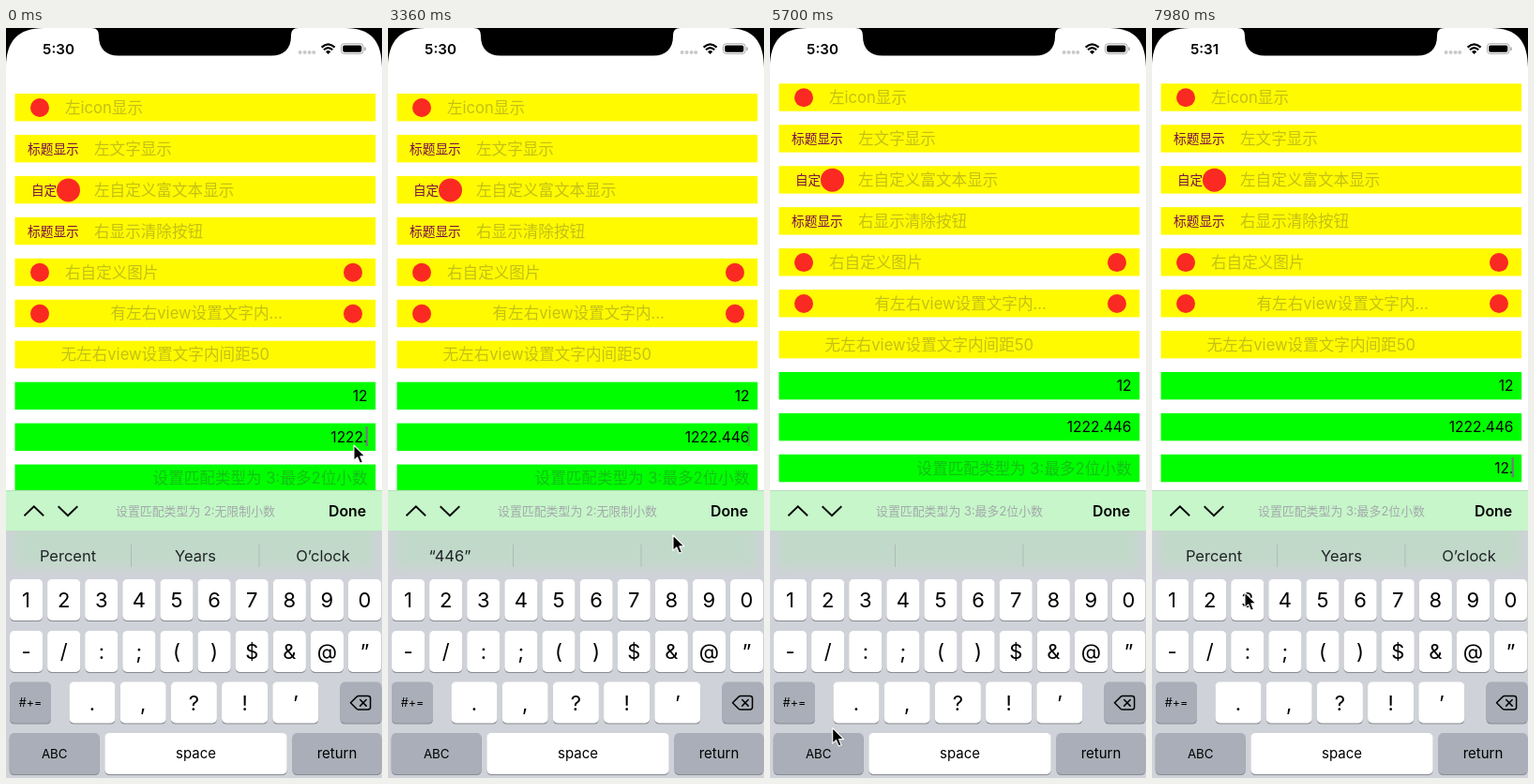
These frames come from a looping animation (401 by 800 pixels, 8000 ms). An HTML page:

```html
<!DOCTYPE html>
<html lang="zh-CN">
<head>
<meta charset="utf-8">
<title>Text fields</title>
<style>
  html, body { margin: 0; width: 100%; height: 100%; overflow: hidden; background: #fff; }
  svg { display: block; width: 100%; height: 100%; }
  text { font-family: Inter, "Noto Sans CJK SC", "Noto Sans CJK", "Noto Sans", sans-serif; white-space: pre; }
</style>
</head>
<body>
<svg id="stage" viewBox="0 0 401 800"></svg>
<script>
const LOOP = 8000, STEP = 60;
const FOCUS = 3960, SWITCH = 4960, CLOCK = 7200;
const HINT = 'rgba(60,60,67,.3)', RED = '#fa2a22', PURPLE = '#7a0c48';

// [time, key, field]
const taps = [
  [900, '4', 8], [1260, '4', 8], [1800, '6', 8],
  [6540, '1', 9], [6960, '2', 9], [7500, '.', 9]
];
// [time, x, y] of the pointer tip
const path = [
  [0, 371, 445], [300, 371, 445], [840, 150, 606], [1380, 150, 606], [1740, 238, 595],
  [2040, 238, 595], [3000, 304, 541], [3420, 304, 541], [3840, 318, 480], [4260, 318, 480],
  [4840, 69, 750], [5580, 69, 757], [6300, 38, 618], [6600, 38, 618], [6880, 72, 610],
  [7020, 72, 610], [7400, 97, 732], [7620, 97, 733], [7940, 99, 602], [8000, 99, 602]
];

const text = (s, x, y, size, o = {}) =>
  `<text x="${x}" y="${y}" font-size="${size}" fill="${o.fill || '#000'}" text-anchor="${o.anchor || 'start'}"` +
  ` font-weight="${o.weight || 400}"${o.id ? ` id="${o.id}"` : ''}>${s.replace('&', '&amp;')}</text>`;
const mid = (s, x, y, size, o = {}) => text(s, x, y, size, { anchor: 'middle', ...o });
const rect = (x, y, w, h, fill, more = '') =>
  `<rect x="${x}" y="${y}" width="${w}" height="${h}" fill="${fill}" ${more}/>`;
const dot = (x, y, r, fill) => `<circle cx="${x}" cy="${y}" r="${r}" fill="${fill}"/>`;
const line = (d, width, more = '') =>
  `<path d="${d}" fill="none" stroke="#000" stroke-width="${width}" ${more}/>`;

const rowY = i => 70 + i * 43.95;

function fields() {
  const hints = [
    ['左icon显示', 63], ['左文字显示', 94], ['左自定义富文本显示', 94], ['右显示清除按钮', 94],
    ['右自定义图片', 63], ['有左右view设置文字内…', 111.5], ['无左右view设置文字内间距50', 58.5]
  ];
  let out = '';
  for (let i = 0; i < 10; i++) {
    const y = rowY(i), c = y + 14.7;
    out += rect(9.5, y, 384.7, 29.4, i < 7 ? '#fffa00' : '#00fd00');
    if (hints[i]) out += text(hints[i][0], hints[i][1], c + 6, 16.6, { fill: HINT });
    if (i === 0 || i === 4 || i === 5) out += dot(36, c + .3, 10, RED);
    if (i === 4 || i === 5) out += dot(370, c + .3, 10, RED);
    if (i === 1 || i === 3) out += text('标题显示', 23, c + 5, 13.7, { fill: PURPLE });
    if (i === 2) out += text('自定', 27, c + 5.6, 13.6, { fill: PURPLE }) + dot(66.5, c + .3, 12.5, RED);
    if (i > 6) out += text(i === 7 ? '12' : '', 385.5, c + 5.6, 15.5, { anchor: 'end', id: 'value' + i });
  }
  out += text('设置匹配类型为 3:最多2位小数', 385.5, rowY(9) + 20.7, 16.6,
    { anchor: 'end', fill: HINT, id: 'hint' });
  return out + rect(383.6, 0, 2.2, 21, '#74797a', 'id="caret"');
}

function statusBar() {
  return `<path d="M0 0H401V42C401 14 389 0 362 0H312C306 0 304 3 304 9C304 22 296 29.5 283 29.5H120` +
    `C107 29.5 99 22 99 9C99 3 97 0 91 0H40C13 0 0 14 0 42Z"/>` +
    mid('5:30', 56, 28, 15.2, { weight: 600, id: 'clock' }) +
    [313.6, 318.6, 323.6, 328.2].map(x => dot(x, 26, 2, '#c9c9cc')).join('') +
    line('M336.6 20.6Q343.6 14 350.6 20.6M339 23.3Q343.6 19 348.2 23.3', 2.2) +
    '<path d="M341 25.2Q343.6 23 346.2 25.2L343.6 28Z"/>' +
    rect(357.5, 16.8, 23.5, 10.6, 'none', 'rx="3" stroke="#a5a5a5"') +
    rect(359.2, 18.5, 20.1, 7.2, '#000', 'rx="1.6"') +
    rect(382.2, 20.2, 1.5, 4, '#a5a5a5', 'rx=".8"');
}

function key(label, x, y, w, size = 22, fill = '#fff', id = '') {
  const box = rect(x, y + 1.1, w, 44, '#898c91', 'rx="5"') +
    rect(x, y, w, 44, fill, `rx="5" ${id ? `id="${id}"` : ''}`);
  return box + (label ? mid(label, x + w / 2, y + 22 + size * .365, size) : '');
}
const GREY = '#a9aeb8', Y1 = 588, Y2 = 643, Y3 = 697.5, Y4 = 752;
const keyRow = (chars, x, y, pitch, w) =>
  [...chars].map((c, i) => key(c, x + i * pitch, y, w)).join('');

function keyboard() {
  const letters = keyRow('QWERTYUIOP', 4, Y1, 40.1, 35.2) + keyRow('ASDFGHJKL', 24.5, Y2, 40.1, 35.2) +
    keyRow('ZXCVBNM', 64.7, Y3, 40.1, 35.2) + key('', 4, Y3, 44) +
    '<path d="M26 711.5L36.3 721.3H31V727H21V721.3H15.7Z" stroke="#000" stroke-linejoin="round"/>' +
    key('123', 3.7, Y4, 96, 14.6, GREY);
  const digits = keyRow('1234567890', 4, Y1, 40.1, 35.2) + keyRow('-/:;()$&@”', 4, Y2, 40.1, 35.2) +
    keyRow('.,?!’', 67.5, Y3, 54.2, 49) + key('#+=', 4, Y3, 44, 12.5, GREY) +
    key('ABC', 3.7, Y4, 96, 13.3, GREY, 'mode');
  return `<g id="letters">${letters}</g><g id="digits">${digits}</g>` +
    key('', 356.5, Y3, 44, 1, GREY) +
    line('M367.5 719.8L374 713.4Q374.8 712.6 376 712.6H386Q388.6 712.6 388.6 715V724.6Q388.6 727 386 727H376Q374.8 727 374 726.2Z' +
      'M377.7 716.5L384.2 723.1M384.2 716.5L377.7 723.1', 1.5, 'stroke-linejoin="round" stroke-linecap="round"') +
    key('space', 105.3, Y4, 194.4, 15) + key('return', 305.5, Y4, 95, 15, GREY);
}

function accessory() {
  return rect(0, 493, 401, 307, '#cfd2d8') +
    '<g clip-path="url(#below)">' + rect(8, 480, 385, 95, '#c1d9c8', 'filter="url(#soft)"') + '</g>' +
    rect(0, 493, 401, 43, '#c6f6c9') + rect(0, 493, 401, .7, '#b4d4b8') +
    line('M19.5 520.3L29.8 510.3L40.1 520.3M55.7 510.3L66 520.3L76.3 510.3', 1.9) +
    mid('', 202, 520, 12.9, { fill: '#a3a8ab', id: 'title' }) +
    text('Done', 344, 521, 15.8, { weight: 600 }) +
    rect(133, 551, 1, 24, '#aebdb4') + rect(269.5, 551, 1, 24, '#aebdb4') +
    [66, 202, 338].map((x, i) => mid('', x, 568.5, 16.5, { fill: '#20242a', id: 'word' + i })).join('');
}

const stage = document.getElementById('stage');
stage.innerHTML = `<defs>
  <filter id="soft" x="-10%" y="-40%" width="120%" height="180%"><feGaussianBlur stdDeviation="6"/></filter>
  <filter id="shade" x="-30%" y="-30%" width="160%" height="160%"><feDropShadow dx="0" dy="1" stdDeviation="2.5" flood-opacity=".3"/></filter>
  <clipPath id="below"><rect x="0" y="536" width="401" height="70"/></clipPath>
  </defs>` + rect(0, 0, 401, 800, '#fff') +
  `<g id="list">${fields()}</g>` + statusBar() + accessory() + keyboard() +
  '<g id="popup"><path id="bubble" fill="#fff" filter="url(#shade)"/>' + mid('', 0, 567, 33, { weight: 300, id: 'big' }) + '</g>' +
  `<g id="pointer"><path d="M0 0V16.4L3.8 12.9L6.5 19.2L9.4 18L6.8 11.9H11.9Z"
    stroke="#fff" stroke-width="1.1" stroke-linejoin="round"/></g>`;

const el = id => document.getElementById(id);
const show = (id, on) => el(id).setAttribute('display', on ? 'inline' : 'none');
const write = (id, s) => { if (el(id).textContent !== s) el(id).textContent = s; };
const place = (id, x, y) => el(id).setAttribute('transform', `translate(${x} ${y})`);

function pointerAt(t) {
  const i = Math.max(1, path.findIndex(p => p[0] > t));
  const [t0, x0, y0] = path[i - 1], [t1, x1, y1] = path[i];
  const u = (t - t0) / (t1 - t0), e = u * u * (3 - 2 * u);
  return [x0 + (x1 - x0) * e, y0 + (y1 - y0) * e];
}

const typed = (field, t) => taps.filter(k => k[2] === field && k[0] <= t).map(k => k[1]).join('');

function suggestions(t) {
  const late = t - 120, words = ['Percent', 'Years', 'O’clock'];
  const s = typed(t < FOCUS ? 8 : 9, late);
  if (s.endsWith('.') || (t < FOCUS && !s)) return words;
  return [s && `“${s}”`, '', ''];
}

function popup(t) {
  const tap = taps.find(k => t >= k[0] - 60 && t < k[0] + 120);
  show('popup', tap);
  if (!tap) return;
  const c = tap[1], isDot = c === '.';
  const x = isDot ? 67.5 : 4 + '1234567890'.indexOf(c) * 40.1;
  const y = isDot ? Y3 : Y1, w = isDot ? 49 : 35.2, r = x + w;
  const a = Math.max(1, x - 12.5), b = r + 12.5;
  el('bubble').setAttribute('d',
    `M${a + 9} ${y - 60}H${b - 9}Q${b} ${y - 60} ${b} ${y - 51}V${y - 21}` +
    `C${b} ${y - 6} ${r} ${y - 8} ${r} ${y + 10}V${y + 39}Q${r} ${y + 44} ${r - 5} ${y + 44}` +
    `H${x + 5}Q${x} ${y + 44} ${x} ${y + 39}V${y + 10}C${x} ${y - 8} ${a} ${y - 6} ${a} ${y - 21}` +
    `V${y - 51}Q${a} ${y - 60} ${a + 9} ${y - 60}Z`);
  write('big', c);
  el('big').setAttribute('x', x + w / 2);
  el('big').setAttribute('y', y - 21);
}

function caretOpacity(t) {
  const last = Math.max(0, ...taps.map(k => k[0]).concat(FOCUS).filter(k => k <= t));
  const p = (t - last) % 1000;
  return p < 500 ? 1 : p < 620 ? (620 - p) / 120 : p < 920 ? 0 : (p - 920) / 80;
}

function draw(t) {
  const second = t >= FOCUS;
  const u = Math.min(1, Math.max(0, (t - FOCUS) / 370));
  place('list', 0, -10.7 * (1 - (1 - u) ** 3));

  const last = typed(9, t);
  write('value8', '1222.' + typed(8, t));
  write('value9', last);
  show('hint', !last);
  el('caret').setAttribute('y', rowY(second ? 9 : 8) + 3.5);
  el('caret').setAttribute('opacity', caretOpacity(t));

  write('clock', t < CLOCK ? '5:30' : '5:31');
  write('title', '设置匹配类型为 ' + (second ? '3:最多2位小数' : '2:无限制小数'));
  suggestions(t).forEach((s, i) => write('word' + i, s));

  const letters = second && t < SWITCH;
  show('letters', letters);
  show('digits', !letters);
  el('mode').setAttribute('fill', t >= SWITCH && t < SWITCH + 100 ? '#fff' : GREY);
  popup(t);
  place('pointer', ...pointerAt(t));
}

const start = performance.now();
function tick() {
  const t = (performance.now() - start) % LOOP;
  draw(Math.floor(t / STEP) * STEP);
  requestAnimationFrame(tick);
}
tick();
</script>
</body>
</html>
```
